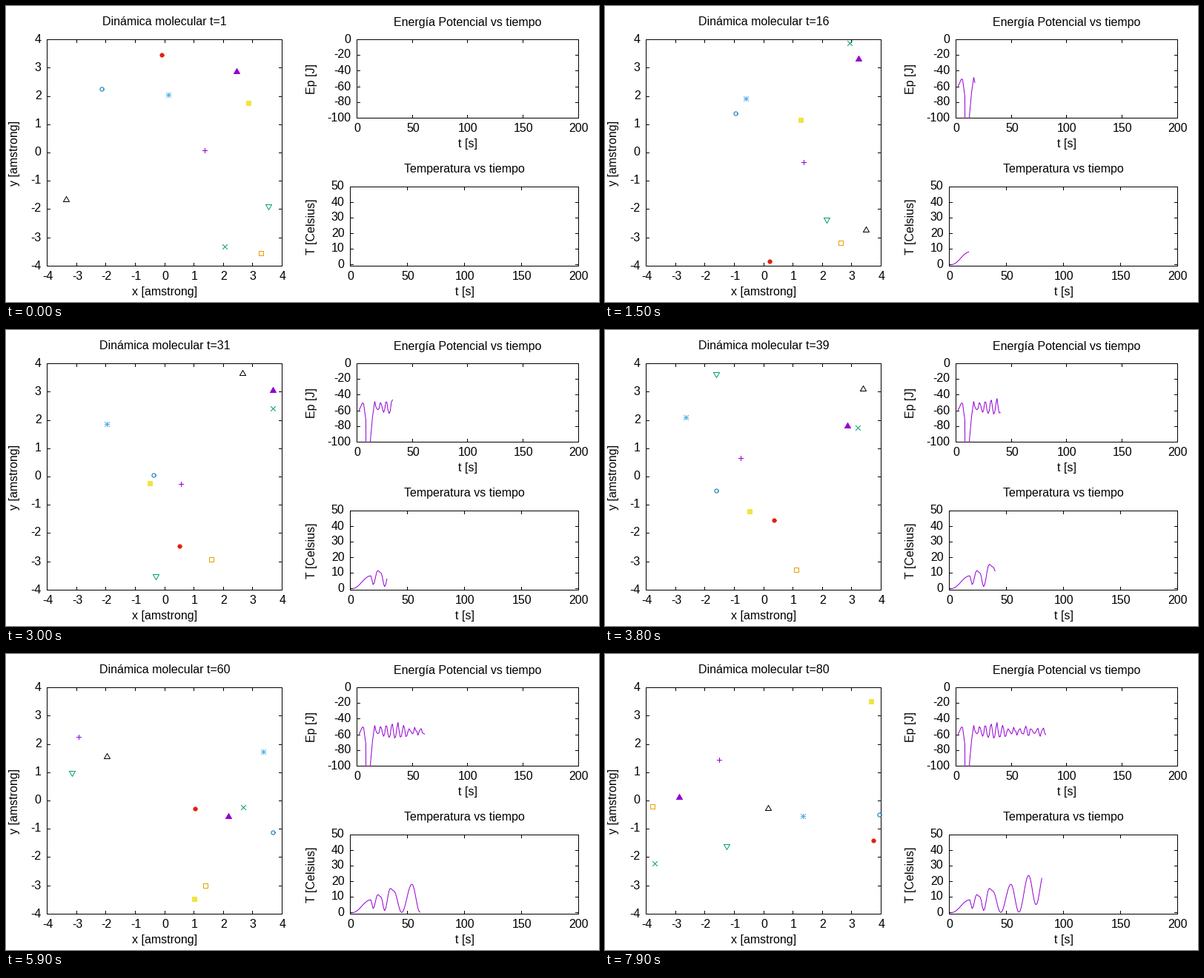
A matplotlib script for the animation above (8 s loop, 800x400 px).

```python
import numpy as np
import matplotlib.pyplot as plt
from matplotlib.animation import FuncAnimation
from matplotlib.patches import PathPatch, Rectangle
from matplotlib.path import Path

DPI, FRAMES, STEP = 100, 80, 100
PX = 72 / DPI  # one pixel in points
PURPLE, GREEN, SKY, ORANGE = "#9400d3", "#009e73", "#56b4e9", "#e69f00"
YELLOW, BLUE, RED, BLACK = "#f0e442", "#0072b2", "#e51e10", "#000000"

plt.rcParams["font.family"] = "Liberation Sans"
plt.rcParams["font.size"] = 16 * PX
plt.rcParams["path.simplify"] = False

fig = plt.figure(figsize=(8, 4), dpi=DPI, facecolor="white")
ax = fig.add_axes([0, 0, 1, 1])
ax.set(xlim=(-0.5, 799.5), ylim=(399.5, -0.5))  # integers are pixel centres
ax.axis("off")


def line(xs, ys, color=BLACK, z=2):
    return ax.plot(xs, ys, color=color, lw=PX, snap=False, zorder=z,
                   solid_capstyle="projecting", solid_joinstyle="miter")[0]


def label(x, y, text, ha="center", rotation=0):
    return ax.text(x, y, text, ha=ha, va="baseline", rotation=rotation,
                   rotation_mode="anchor")


class Panel:
    def __init__(self, box, xlim, ylim, xticks, yticks, title, xname, yname, yname_at):
        self.box, self.xlim, self.ylim = box, xlim, ylim
        l, t, r, b = box
        line([l, r, r, l, l], [t, t, b, b, t])
        for v in xticks:
            x = round(self.x(v))
            line([x, x], [b, b - 4])
            line([x, x], [t, t + 4])
            label(x + 0.5, b + 19, str(v))
        for v in yticks:
            y = round(self.y(v))
            line([l, l + 4], [y, y])
            line([r, r - 4], [y, y])
            label(l - 8, y + 4, str(v), ha="right")
        mid = (l + r) / 2
        self.title = label(mid, t - 19, title)
        label(mid, b + 40, xname)
        label(yname_at, (t + b) / 2, yname, rotation=90)

    def x(self, v):
        l, _, r, _ = self.box
        lo, hi = self.xlim
        return l + (np.asarray(v) - lo) / (hi - lo) * (r - l)

    def y(self, v):
        _, t, _, b = self.box
        lo, hi = self.ylim
        return b - (np.asarray(v) - lo) / (hi - lo) * (b - t)

    def curve(self, xs, ys):
        l, t, r, b = self.box
        art = line([], [], PURPLE, z=3)
        art.set_clip_path(Rectangle((l, t), r - l, b - t, transform=ax.transData))
        return art, self.x(xs), self.y(ys)


box = Panel((55, 45, 372, 351), (-4, 4), (-4, 4), range(-4, 5), range(-4, 5),
            "Dinámica molecular t=1", "x [amstrong]", "y [amstrong]", 16)
energy = Panel((473, 45, 772, 151), (0, 200), (-100, 0), range(0, 201, 50),
               range(-100, 1, 20), "Energía Potencial vs tiempo", "t [s]", "Ep [J]", 416)
heat = Panel((464, 244, 772, 351), (0, 200), (-1, 50), range(0, 201, 50),
             range(0, 51, 10), "Temperatura vs tiempo", "t [s]", "T [Celsius]", 416)


def potential(t):
    """A deep early well, then a noisy ripple whose swing peaks near t = 33."""
    start = np.interp(t, [2, 5, 6, 8, 9, 11, 12, 14, 16],
                      [-59, -50, -51, -72, -400, -300, -99, -68, -48])
    swing = 5 + 6 * np.exp(-((t - 33) / 9) ** 2)
    noise = np.random.default_rng(4).uniform(-2.5, 2.5, len(t))
    ripple = -56 + swing * np.cos(2 * np.pi * (t - 16) / 5.2) + noise
    return np.where(t <= 16, start, ripple)


def temperature(t):
    """Cosine easing from one turning point to the next."""
    at = np.array([2, 18, 20, 24, 27, 30, 35, 38, 45, 54, 61, 69.5, 76, 83])
    level = np.array([0, 8.2, 2.5, 11.6, 10, 1.2, 15.6, 14, 0, 18.3, 0.2, 24, 5, 26])
    k = np.clip(np.searchsorted(at, t, side="right") - 1, 0, len(at) - 2)
    u = (t - at[k]) / (at[k + 1] - at[k])
    return level[k] + (level[k + 1] - level[k]) * (1 - np.cos(np.pi * u)) / 2


times = np.arange(2, FRAMES + 2)
curves = [energy.curve(times, potential(times)), heat.curve(times, temperature(times))]
ax.plot(energy.x([2]), energy.y([-59]), ",", color=PURPLE)


def strokes(*lines):
    return Path.make_compound_path(*(Path(p) for p in lines))


def ring(radius, n=16):
    a = np.linspace(0, 2 * np.pi, n + 1)
    return strokes(np.c_[np.cos(a), np.sin(a)] * radius)


plus = [[(-3, 0), (3, 0)], [(0, -3), (0, 3)]]
cross = [[(-3, -3), (3, 3)], [(-3, 3), (3, -3)]]
square = strokes([(-3, -3), (3, -3), (3, 3), (-3, 3), (-3, -3)])
up = strokes([(-4, 3), (0, -4), (4, 3), (-4, 3)])
down = strokes([(-4, -3), (0, 4), (4, -3), (-4, -3)])

# Shape, colour, filled, then a few waypoints in the periodic box
KEYS = np.array([0, 30, 50, 79])
ATOMS = [
    (strokes(*plus), PURPLE, False, [(268, 195), (236, 208), (104, 118), (154, 143)]),
    (strokes(*cross), GREEN, False, [(295, 325), (360, 106), (310, 174), (67, 283)]),
    (strokes(*plus, *cross), SKY, False, [(219, 120), (136, 127), (65, 110), (267, 219)]),
    (square, ORANGE, False, [(344, 334), (277, 310), (243, 339), (64, 206)]),
    (square, YELLOW, True, [(327, 131), (194, 207), (220, 304), (359, 64)]),
    (ring(2.6), BLUE, False, [(129, 112), (199, 196), (62, 241), (370, 217)]),
    (ring(2.6), RED, True, [(210, 66), (234, 292), (226, 210), (362, 252)]),
    (up, BLACK, False, [(81, 261), (319, 58), (96, 109), (220, 208)]),
    (up, PURPLE, True, [(311, 88), (360, 81), (279, 206), (100, 193)]),
    (down, GREEN, False, [(354, 271), (202, 333), (86, 118), (164, 260)]),
]
ORIGIN, SPAN = np.array([55, 45]), np.array([317, 306])
way = (np.array([a[3] for a in ATOMS]) - ORIGIN) / SPAN
way = np.unwrap(way, axis=1, period=1)
slope = np.gradient(way, KEYS, axis=1)
slope[:, 0] = 0  # atoms start at rest

marks = [ax.add_patch(PathPatch(s, fill=f, fc=c, ec=c, lw=PX, snap=False,
                                capstyle="projecting", joinstyle="round", zorder=4))
         for s, c, f, _ in ATOMS]


def positions(i):
    """Cubic Hermite path, wrapped back into the box."""
    k = min(np.searchsorted(KEYS, i, side="right") - 1, len(KEYS) - 2)
    h = KEYS[k + 1] - KEYS[k]
    u = (i - KEYS[k]) / h
    p = ((2 * u**3 - 3 * u**2 + 1) * way[:, k] + (3 * u**2 - 2 * u**3) * way[:, k + 1]
         + h * ((u**3 - 2 * u**2 + u) * slope[:, k] + (u**3 - u**2) * slope[:, k + 1]))
    return np.round(ORIGIN + p % 1 * SPAN)


def draw(i):
    box.title.set_text(f"Dinámica molecular t={i + 1}")
    for mark, atom, pos in zip(marks, ATOMS, positions(i)):
        mark.set_path(Path(atom[0].vertices + pos, atom[0].codes))
    for art, xs, ys in curves:
        art.set_data(xs[:i + 1], ys[:i + 1])
    return [box.title, *marks, *(c[0] for c in curves)]


anim = FuncAnimation(fig, draw, frames=FRAMES, interval=STEP, repeat=True,
                     repeat_delay=0, blit=False)
plt.show()
```
